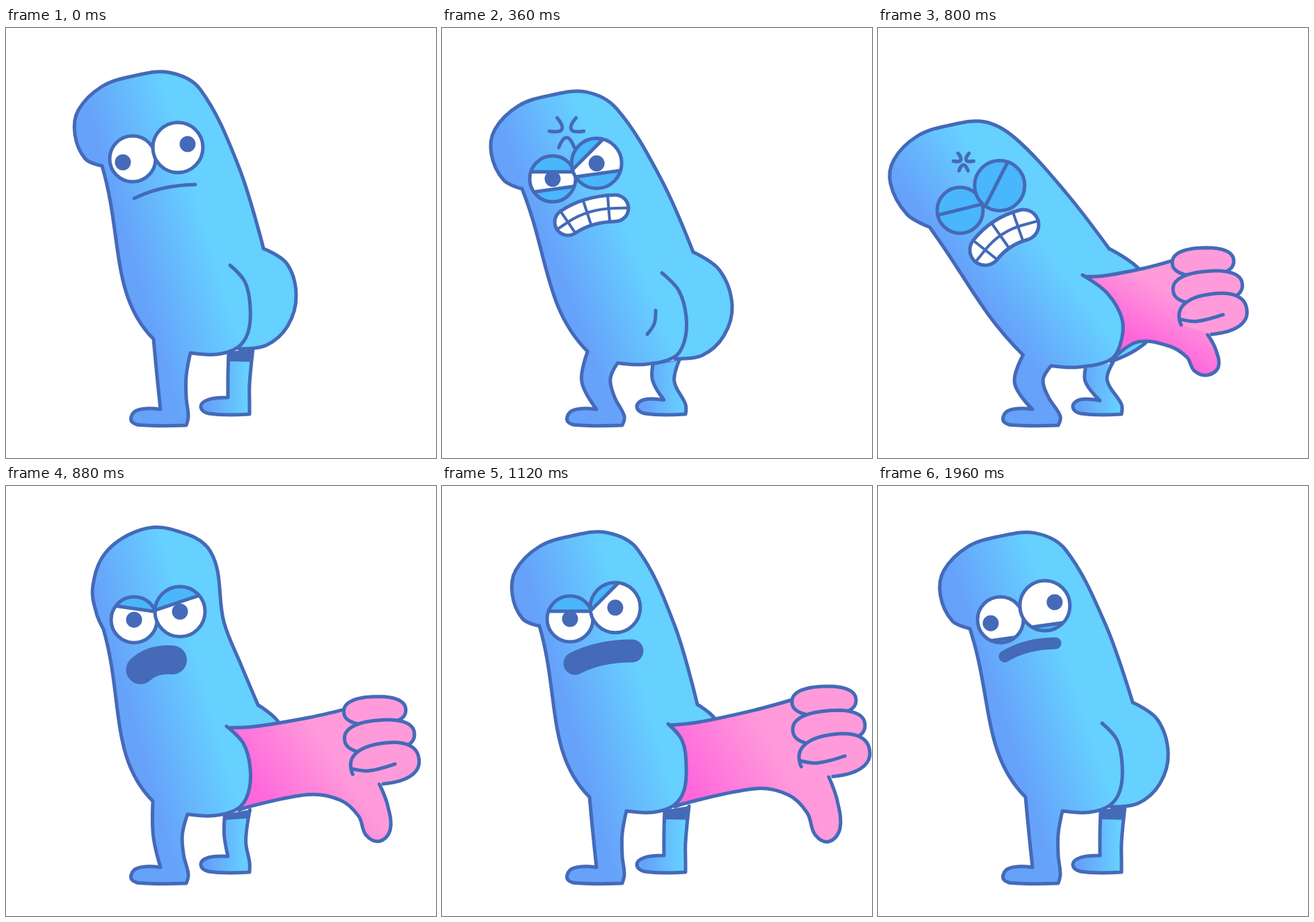
Write an HTML page with a canvas that moves like this. It is 618x618 px and loops after 2040 ms.

```html
<!DOCTYPE html>
<html lang="en">
<head>
<meta charset="utf-8">
<title>Thumbs down</title>
<style>
  html, body { margin: 0; width: 100%; height: 100%; overflow: hidden; background: #fff; }
  canvas { display: block; width: 618px; height: 618px; }
</style>
</head>
<body>
<canvas id="stage" width="618" height="618"></canvas>
<script>
const ctx = document.getElementById('stage').getContext('2d');
const LOOP = 2040, STEP = 40, RAD = Math.PI / 180;
const INK = '#446ab8', DEEP = '#66a1fa', SKY = '#66d0ff', LID = '#4ab6fc';
const HOT = '#ff66dc', PINK = '#ff9bda';

// neck, waist and cleft anchor the body; everything else hangs off them.
// lids: angle and offset for each eye; mouth: both ends and thickness;
// fist: position and scale
const idle = {
  neck: [138, 198], waist: [370, 317], cleft: [322, 341],
  lean: 0, turn: 0, squat: 0, cheek: 1,
  wall: 1, lids: [0, 40, -20, 42], low: 42, shut: 0,
  mouth: [184, 245, 272, 225, 5], rage: 0, dimple: 0,
  fist: [300, 385, .2], thumb: 1
};
const strain = { ...idle,
  neck: [115, 231], waist: [361, 322], cleft: [316, 352],
  lean: .3, squat: .9, wall: 0, lids: [0, 10, -45, 18], low: 15,
  mouth: [181, 279, 249, 259, 43], rage: 1.7, dimple: 1
};
const push = { ...idle,
  neck: [74, 286], waist: [332, 317], cleft: [294, 355],
  lean: 1, squat: 1.15, cheek: .8, wall: 0, lids: [-14, 1, -63, 5], shut: 1,
  mouth: [154, 319, 209, 283, 49], rage: 1,
  fist: [422, 315, .96], thumb: .65
};
const show = { ...idle,
  neck: [140, 201], waist: [367, 314], cleft: [325, 342],
  cheek: .8, wall: 0, lids: [0, 11, -45, 22],
  mouth: [191, 255, 273, 237, 33], fist: [502, 287, 1]
};
const stretch = { ...show,
  neck: [156, 185], waist: [371, 314], turn: 1, lids: [11, 18, -16, 18],
  mouth: [202, 248, 257, 238, 37], fist: [505, 294, .98]
};
const pull = { ...show,
  neck: [144, 190], waist: [369, 311], cleft: [326, 337],
  squat: -.2, cheek: .95, lids: [0, 23, -15, 30], low: 27,
  mouth: [203, 238, 260, 228, 31], dimple: 1, fist: [473, 302, .92], thumb: .85
};
const relax = { ...idle,
  neck: [132, 205], waist: [366, 311], lean: .2, low: 28,
  mouth: [182, 245, 255, 226, 17]
};

const mix = (a, b, k) => Array.isArray(a) ? a.map((v, i) => mix(v, b[i], k)) : a + (b - a) * k;
const add = (p, x, y, s = 1) => [p[0] + x * s, p[1] + y * s];
function blend(p, q, k) {
  const out = {};
  for (const name in p) out[name] = mix(p[name], q[name], k);
  return out;
}

const rebound = blend(idle, strain, .96);
const windup = { ...blend(strain, push, 1.22), cleft: strain.cleft, cheek: 1, fist: idle.fist };
const keys = [
  [0, idle], [160, idle], [360, strain], [400, strain], [480, rebound], [600, rebound],
  [720, windup], [800, push], [920, blend(show, stretch, 1.45)], [1000, stretch],
  [1120, show], [1720, show], [1760, pull], [1800, blend(show, pull, 1.5)],
  [1880, blend(pull, relax, .85)], [1960, relax], [LOOP, relax]
];

function poseAt(t) {
  const i = keys.findIndex(k => k[0] > t);
  const [t0, p] = keys[i - 1], [t1, q] = keys[i];
  const k = (t - t0) / (t1 - t0);
  return blend(p, q, k * k * (3 - 2 * k));
}

// Adds a smooth curve through the points; corners stay sharp
function trace(path, pts, corners = []) {
  const last = pts.length - 1;
  const handle = (i, len) => {
    if (i === 0 || i === last || corners.includes(i)) return pts[i];
    const dx = pts[i + 1][0] - pts[i - 1][0], dy = pts[i + 1][1] - pts[i - 1][1];
    return add(pts[i], dx, dy, len * .35 / (Math.hypot(dx, dy) || 1));
  };
  for (let i = 1; i <= last; i++) {
    const [ax, ay] = pts[i - 1], [x, y] = pts[i];
    const len = Math.hypot(x - ax, y - ay);
    path.bezierCurveTo(...handle(i - 1, len), ...handle(i, -len), x, y);
  }
  return path;
}
function curve(pts, corners) {
  const path = new Path2D();
  path.moveTo(...pts[0]);
  return trace(path, pts, corners);
}

function ramp([x0, y0], [x1, y1], from, to) {
  const g = ctx.createLinearGradient(x0, y0, x1, y1);
  g.addColorStop(0, from);
  g.addColorStop(1, to);
  return g;
}
function paint(path, fill) {
  ctx.fillStyle = fill;
  ctx.fill(path);
  ctx.stroke(path);
}

// Joints that follow from the pose
function rig(p) {
  const k = p.squat;
  return { ...p,
    side: [351, 401 + 16 * k],
    crotch: [265 - 14 * k, 467 + 16 * k],
    hip: [212 - 3 * k, 447 + 20 * k],
    eye: add(p.neck, 44, -10 - 14 * p.lean),
    tilt: (-14 - 18 * p.lean + 8 * p.turn) * RAD
  };
}

function drawBackLeg({ squat: k }) {
  const left = [320 - 19 * k, 466 + 20 * k], right = [355 - 15 * k, 460 + 18 * k];
  const kneeL = [319 - 18 * k, 500 + 8 * k], kneeR = [350 - 18 * k, 512 - 5 * k];
  const leg = curve([left, kneeL, [319, 531 + 4 * k], [291, 534], [280, 544], [291, 554],
    [350, 555], [350, 541], kneeR, right], [2, 6]);
  paint(leg, ramp([290, 0], [345, 0], DEEP, SKY));
  const shade = Math.max(0, .38 * (1 - k));
  ctx.fillStyle = INK;
  ctx.beginPath();
  for (const q of [left, right, mix(right, kneeR, shade), mix(left, kneeL, shade)]) ctx.lineTo(...q);
  ctx.fill();
}

function drawButt({ waist, side, cleft, cheek }, skin) {
  const out = add(side, 66, -17, cheek);
  const path = curve([waist, add(mix(waist, out, .5), 10, -12), out, add(side, 54, 27, cheek),
    add(side, 23, 55, cheek), add(side, -16, 60)]);
  const under = new Path2D(path);
  for (const q of [add(side, -60, 20), add(cleft, -40, -10), add(waist, -30, -20)]) under.lineTo(...q);
  ctx.fillStyle = skin;
  ctx.fill(under);
  ctx.stroke(path);
}

const thumbShape = [[54, 131], [66, 165], [70, 205], [54, 224], [34, 214], [23, 183], [-4, 157], [-52, 148]];

function drawHand({ fist: [fx, fy, s], thumb, cleft, side }) {
  if (s < .25) return;
  const at = (x, y) => [fx + x * s, fy + y * s];
  const from = add(cleft, -4, 2), to = at(2, 20);
  const top = [from, add(mix(from, to, .25), 0, 5), add(mix(from, to, .7), 0, 4), to];
  const bottom = thumbShape.map(([x, y]) => at(x, 131 + (y - 131) * thumb));
  bottom.push(add(side, -16, 59));
  ctx.fillStyle = ramp([355, 435], [Math.max(fx - 25, 365), 365], HOT, PINK);
  ctx.fill(curve([...top, at(68, 43), ...bottom], [3, 4, 5]));
  ctx.stroke(curve(top));
  ctx.stroke(curve(bottom));

  // Fingers are tilted, slightly boxy ovals
  const bulge = v => Math.sign(v) * Math.abs(v) ** .85;
  const finger = (cx, cy, rx, ry, tilt, a0 = 0, a1 = 360) => {
    const path = new Path2D(), c = Math.cos(tilt * RAD), d = Math.sin(tilt * RAD);
    for (let a = a0; a <= a1; a += 5) {
      const x = rx * bulge(Math.cos(a * RAD)), y = ry * bulge(Math.sin(a * RAD));
      path.lineTo(...at(cx + x * c - y * d, cy + x * d + y * c));
    }
    paint(path, PINK);
  };
  finger(47, 22, 46, 21, -2);
  finger(54, 60, 52, 24, -5);
  finger(62, 100, 51, 30, -8, 165, 455);
  ctx.stroke(curve([at(13, 108), at(38, 111), at(77, 101)]));
}

const profile = [[0, 0], [-24, -10], [-39, -45], [-34, -80], [0, -114], [45, -129], [97, -134], [141, -110]];
const front = [[0, 0], [-9, -20], [-13, -55], [4, -103], [49, -135], [96, -139], [154, -109], [175, -13]];

function drawBody({ neck, waist, cleft, side, crotch, hip, lean, turn, squat: k }, skin) {
  const path = curve([cleft, add(mix(cleft, side, .5), 7, -6), side, add(side, -3, 36),
    add(side, -18, 58), add(crotch, 38, 2), crotch]);
  trace(path, [crotch, [259 - 19 * k, 500 + 5 * k], [259 - 12 * k, 531], [262, 558], [259, 571],
    [200, 571], [181, 566], [184, 552], [201, 547], [222, 548],
    [217 - 18 * k, 500 + 9 * k], hip], [4, 9]);
  path.bezierCurveTo(...add(hip, -62, -62), ...mix(neck, hip, .4), ...neck);
  const head = mix(profile, front, turn)
    .map(([x, y], i) => add(add(neck, x, y), -17, -17, lean * Math.min(1, i / 2)));
  const flank = add(mix(head[7], waist, .5), 10, -3, (1 - turn) * (1 - lean / 2));
  trace(path, [...head, flank, waist]);
  paint(path, skin);
}

function drawEye([x, y], r, look, angle, up, low, shut) {
  const rim = new Path2D();
  rim.arc(x, y, r, 0, 7);
  ctx.save();
  ctx.clip(rim);
  ctx.fillStyle = shut ? LID : '#fff';
  ctx.fill(rim);
  if (!shut) {
    ctx.fillStyle = INK;
    ctx.beginPath();
    ctx.arc(x + 14 * look, y - 5 * look, 11.5, 0, 7);
    ctx.fill();
  }
  for (const [turn, off] of [[angle, up], [172, low]]) {
    ctx.save();
    ctx.translate(x, y);
    ctx.rotate(turn * RAD);
    const lid = new Path2D();
    lid.rect(-60, -off - 90, 120, 90);
    paint(lid, LID);
    ctx.restore();
  }
  ctx.restore();
  ctx.stroke(rim);
}

function drawMouth({ mouth: [x0, y0, x1, y1, w], rage }) {
  const a = [x0, y0], b = [x1, y1], c = add(mix(a, b, .5), -6, -9);
  const path = new Path2D();
  path.moveTo(...a);
  path.quadraticCurveTo(...c, ...b);
  const line = (width, color) => {
    ctx.lineWidth = width;
    ctx.strokeStyle = color;
    ctx.stroke(path);
  };
  line(w, INK);
  if (rage > .5 && w > 12) {
    line(w - 10, '#fff');
    line(4, INK);
    for (const t of [0, .45, .88, 1]) {
      const p = mix(a, c, t), q = mix(c, b, t), spot = mix(p, q, t);
      const dx = q[0] - p[0], dy = q[1] - p[1], s = (w / 2 - 2) / Math.hypot(dx, dy);
      ctx.beginPath();
      if (t < 1) {
        ctx.moveTo(...add(spot, dy, -dx, s));
        ctx.lineTo(...add(spot, -dy, dx, s));
      }
      if (t % 1 === 0) {
        ctx.moveTo(...spot);
        ctx.lineTo(...add(spot, dx, dy, t ? s : -s));
      }
      ctx.stroke();
    }
  }
  ctx.lineWidth = 5;
  ctx.strokeStyle = INK;
}

// Three chevrons around a point on the forehead
function drawVein({ eye, tilt, rage }) {
  const r = 13 * rage, up = tilt - 54 * RAD;
  const [x, y] = add(eye, Math.cos(up), Math.sin(up), 70);
  for (let a = -30; a < 330; a += 120) {
    ctx.save();
    ctx.translate(x, y);
    ctx.rotate(a * RAD);
    ctx.stroke(curve([[r, -r / 2], [r * .35, 0], [r, r / 2]]));
    ctx.restore();
  }
}

function draw(pose) {
  const p = rig(pose), { hip, neck, eye, lids, cleft } = p;
  ctx.fillStyle = '#fff';
  ctx.fillRect(0, 0, 618, 618);
  ctx.lineWidth = 5;
  ctx.lineCap = ctx.lineJoin = 'round';
  ctx.strokeStyle = INK;

  const dx = neck[0] - hip[0], dy = neck[1] - hip[1];
  const skin = ramp(hip, add(hip, -dy, dx, 117 / Math.hypot(dx, dy)), DEEP, SKY);
  drawBackLeg(p);
  drawButt(p, skin);
  drawHand(p);
  drawBody(p, skin);
  if (p.dimple > .5) ctx.stroke(curve([add(cleft, -9, 54), add(cleft, -11, 73), add(cleft, -21, 88)]));
  drawMouth(p);
  const shut = p.shut > .5;
  drawEye(eye, 33, -p.wall, lids[0], lids[1], p.low, shut);
  drawEye(add(eye, Math.cos(p.tilt), Math.sin(p.tilt), 67), 36, p.wall, lids[2], lids[3], p.low, shut);
  if (p.rage > .5) drawVein(p);
}

const start = performance.now();
function tick() {
  const t = (performance.now() - start) % LOOP;
  draw(poseAt(Math.floor(t / STEP) * STEP));
  requestAnimationFrame(tick);
}
tick();
</script>
</body>
</html>
```
